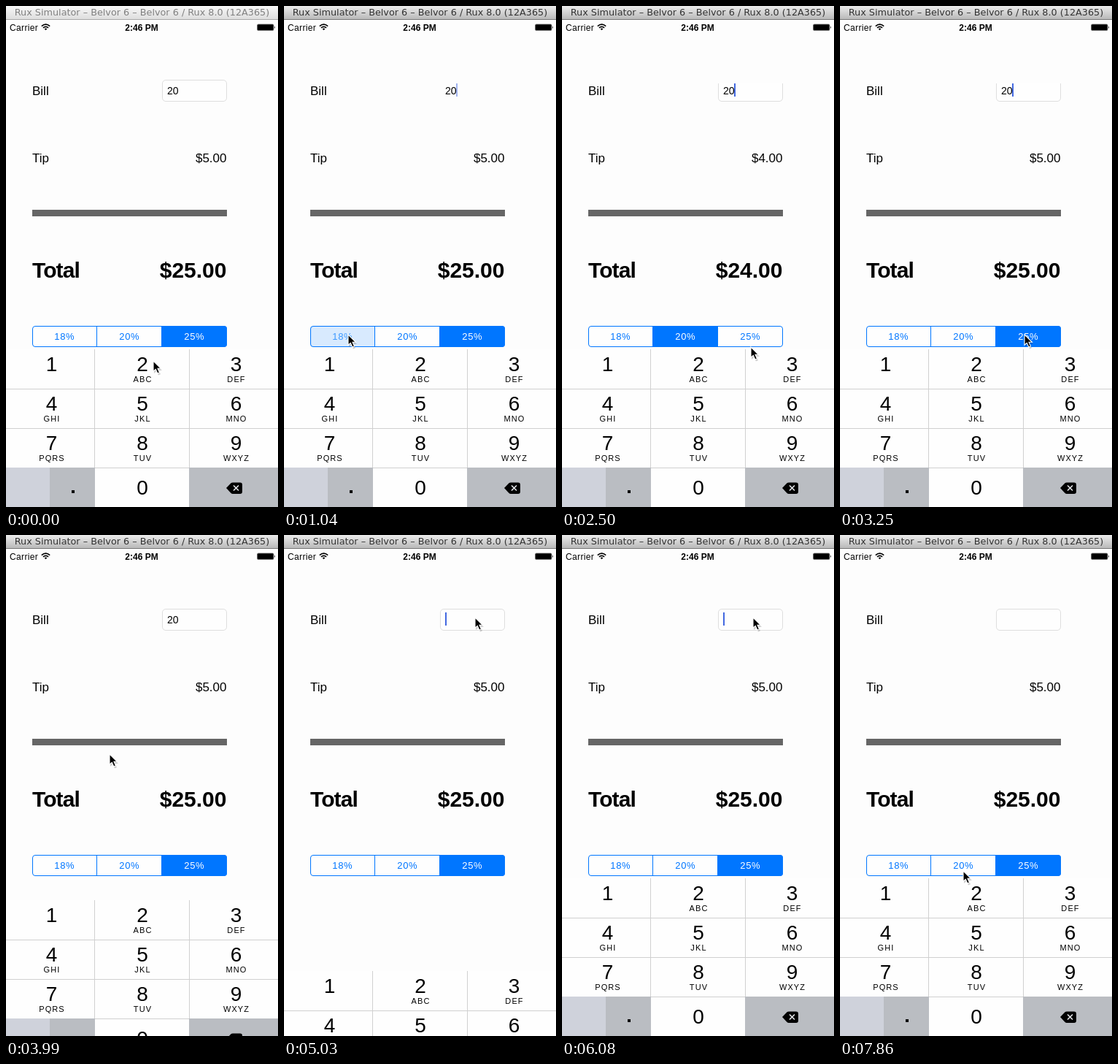
Recreate the animation shown at these times as an HTML page. Size 373 by 686 pixels, loop 8 s.

```html
<!DOCTYPE html>
<html lang="en">
<head>
<meta charset="utf-8">
<title>Tip calculator</title>
<style>
  html, body { margin: 0; width: 100%; height: 100%; overflow: hidden; background: #fdfdfd; }
  svg { display: block; width: 100vw; height: 100vh; font-family: "Liberation Sans", Arial, sans-serif; }
  .mid { text-anchor: middle; }
  .end { text-anchor: end; }
  .label { font-size: 17px; }
  .total { font-size: 30px; font-weight: bold; }
  .digit { font-size: 28px; text-anchor: middle; }
  .letters { font-size: 11px; letter-spacing: 1.1px; text-anchor: middle; }
  .seg { font-size: 13px; letter-spacing: .7px; text-anchor: middle; }
  .title { font: 12.8px "DejaVu Sans", sans-serif; text-anchor: middle; }
</style>
</head>
<body>
<svg viewBox="0 0 373 686">
  <defs>
    <linearGradient id="bar" x2="0" y2="1">
      <stop offset="0" stop-color="#ececec"/><stop offset="1" stop-color="#b9b9b9"/>
    </linearGradient>
    <linearGradient id="barIdle" x2="0" y2="1">
      <stop offset="0" stop-color="#f8f8f8"/><stop offset="1" stop-color="#dedede"/>
    </linearGradient>
    <clipPath id="fieldClip"><rect id="fieldWindow" x="210" y="100" width="100" height="40"/></clipPath>
    <clipPath id="segClip"><rect x="36" y="438" width="267" height="29" rx="4"/></clipPath>
  </defs>
  <rect width="373" height="686" fill="#fdfdfd"/>

  <rect id="titleBar" y="0" width="373" height="18"/>
  <rect id="titleLine" y="18" width="373" height="1"/>
  <text id="title" class="title" x="186.5" y="13">Rux Simulator – Belvor 6 – Belvor 6 / Rux 8.0 (12A365)</text>

  <text x="5" y="33.5" font-size="12" letter-spacing=".35">Carrier</text>
  <g fill="none" stroke="#000" stroke-width="1.6">
    <path d="M48.8 27.7Q54.5 22.6 60.2 27.7M50.9 29.9Q54.5 26.8 58.1 29.9"/>
    <path d="M52.6 31.2Q54.5 29.6 56.4 31.2L54.5 33.2Z" fill="#000" stroke="none"/>
  </g>
  <text class="mid" x="186" y="33.5" font-size="12" font-weight="bold">2:46 PM</text>
  <rect x="344.5" y="25" width="22.5" height="8.5" rx="1.5" fill="#000" stroke="#777" stroke-width=".8"/>
  <path d="M368 27.5q1.8 1.7 0 3.5z"/>

  <g class="label">
    <text x="36" y="121.5">Bill</text>
    <text x="36" y="213.5">Tip</text>
    <text id="tip" class="end" x="302.5" y="213.5"></text>
  </g>
  <rect x="214.5" y="101.5" width="88" height="29" rx="4.5" fill="#fefefe" stroke="#dedede" clip-path="url(#fieldClip)"/>
  <text id="bill" x="221" y="120.5" font-size="14">20</text>
  <rect id="caret" y="106" width="2" height="18" fill="#4268e0"/>
  <rect x="36" y="279" width="267" height="9" fill="#666"/>
  <text class="total" x="36" y="371.5" letter-spacing="-.9">Total</text>
  <text id="total" class="total end" x="302.5" y="371.5"></text>

  <g id="segments" clip-path="url(#segClip)"></g>
  <path d="M124.5 438v29M213.5 438v29" stroke="#0076ff"/>
  <rect x="36.5" y="438.5" width="266" height="28" rx="3.5" fill="none" stroke="#0076ff"/>

  <g id="keyboard"></g>

  <g id="cursor">
    <path d="M1 2V17L4.4 14 7 19.6 10 18.3 7.5 13H12Z" fill="#000" opacity=".18"/>
    <path d="M0 0V14.2L3.3 11.3 5.8 17 8.4 15.9 6 10.3H10.4Z" fill="#000" stroke="#fff" stroke-width="1.1"/>
  </g>
</svg>
<script>
const LOOP = 8000, TICKS = 54;
const BLUE = '#0076ff';
const $ = id => document.getElementById(id);
const set = (id, attrs) => {
  for (const name in attrs) $(id).setAttribute(name, attrs[name]);
};

const RATES = [18, 20, 25];
$('segments').innerHTML = RATES.map((rate, i) =>
  `<rect id="seg${i}" x="${36 + 89 * i}" y="438" width="89" height="29"/>
   <text id="segText${i}" class="seg" x="${80.3 + 89 * i}" y="457">${rate}%</text>`).join('');

function keyboardMarkup() {
  const columns = [62.5, 187, 315.5];
  const letters = ['', 'ABC', 'DEF', 'GHI', 'JKL', 'MNO', 'PQRS', 'TUV', 'WXYZ'];
  const keys = letters.map((word, i) => {
    const x = columns[i % 3], y = 500 + 54 * Math.floor(i / 3);
    return `<text class="digit" x="${x}" y="${y}">${i + 1}</text>
            <text class="letters" x="${x + .5}" y="${y + 15}">${word}</text>`;
  });
  return `<rect y="470" width="373" height="216" fill="#fefefe"/>
    <path d="M0 524.5H373M0 578.5H373M0 632.5H373M121.5 470V686M251.5 470V686" stroke="#d0d0d0"/>
    <rect y="632" width="60" height="54" fill="#cfd2db"/>
    <path d="M60 632h62v54h-62zM251 632h122v54h-122z" fill="#babdc2"/>
    ${keys.join('')}
    <text class="digit" x="187" y="669">0</text>
    <rect x="90" y="663" width="4" height="4"/>
    <path d="M302 660L308.5 653.3Q309.5 652.5 311 652.5H321Q324 652.5 324 655.5V665Q324 668 321 668H311Q309.5 668 308.5 667Z"/>
    <path d="M312 656.5l7 7m0-7l-7 7" stroke="#e4e6e9" stroke-width="1.6"/>`;
}
$('keyboard').innerHTML = keyboardMarkup();

// Each point is [tick, ...values]; values are interpolated linearly.
function along(points, tick) {
  const next = points.findIndex(p => p[0] > tick);
  if (next < 0) return points[points.length - 1].slice(1);
  const a = points[next - 1], b = points[next];
  const k = (tick - a[0]) / (b[0] - a[0]);
  return a.slice(1).map((v, i) => v + (b[i + 1] - v) * k);
}

const CURSOR = [
  [0, 202, 486], [6, 88, 450], [8, 88, 450], [12, 168, 452], [13, 168, 452],
  [17, 259, 467], [20, 253, 450], [22, 253, 450], [24, 180, 333], [25, 142, 300],
  [27, 142, 300], [30, 235, 68], [32, 262, 113], [51, 262, 113], [52, 205, 330], [53, 169, 460]
];
const KEYBOARD = [[0, 0], [26, 0], [27, 30], [28, 150], [29, 216], [32, 216], [33, 200], [34, 127], [35, 35], [36, 0]];
const BLINK = [.5, 0, 0, .5, 1, 1, 1];
const ACTIVATED = 4, DISMISSED = 27, REOPENED = 33;
const PRESSES = { 7: 0, 12: 1, 20: 2 };

function selectedAt(tick) {
  return tick < 8 ? 2 : tick < 13 ? 0 : tick < 21 ? 1 : 2;
}

function caretOpacity(tick) {
  if (tick < ACTIVATED || (tick >= DISMISSED && tick < REOPENED)) return 0;
  const start = tick < REOPENED ? 25 : 44;
  return BLINK[(tick - start + 49) % 7];
}

function draw(tick) {
  const active = tick >= ACTIVATED;
  set('titleBar', { fill: active ? 'url(#bar)' : 'url(#barIdle)' });
  set('titleLine', { fill: active ? '#787878' : '#a8a8a8' });
  set('title', { fill: active ? '#333' : '#808080' });

  const selected = selectedAt(tick), pressed = PRESSES[tick];
  RATES.forEach((_, i) => {
    const fill = i === selected ? BLUE : i === pressed ? '#d8eafe' : '#fefefe';
    const ink = i === selected ? '#fff' : i === pressed ? '#3c99ff' : BLUE;
    set('seg' + i, { fill });
    set('segText' + i, { fill: ink });
  });
  const tip = 20 * RATES[selected] / 100;
  $('tip').textContent = '$' + tip.toFixed(2);
  $('total').textContent = '$' + (20 + tip).toFixed(2);

  // The field outline drops out, comes back without its top edge, then whole.
  const hidden = active && tick < 13;
  const cropped = tick >= 13 && tick < DISMISSED;
  set('fieldWindow', { y: cropped ? 106 : 100, height: hidden ? 0 : 40 });
  const empty = tick >= REOPENED;
  $('bill').textContent = empty ? '' : '20';
  set('caret', { x: empty ? 221 : 236, opacity: caretOpacity(tick) });

  set('keyboard', { transform: `translate(0 ${along(KEYBOARD, tick)})` });
  set('cursor', { transform: `translate(${along(CURSOR, tick)})` });
}

function frame() {
  const time = performance.now() % LOOP;
  draw(Math.min(TICKS - 1, Math.floor((time + 20) * TICKS / LOOP)));
  requestAnimationFrame(frame);
}
frame();
</script>
</body>
</html>
```
